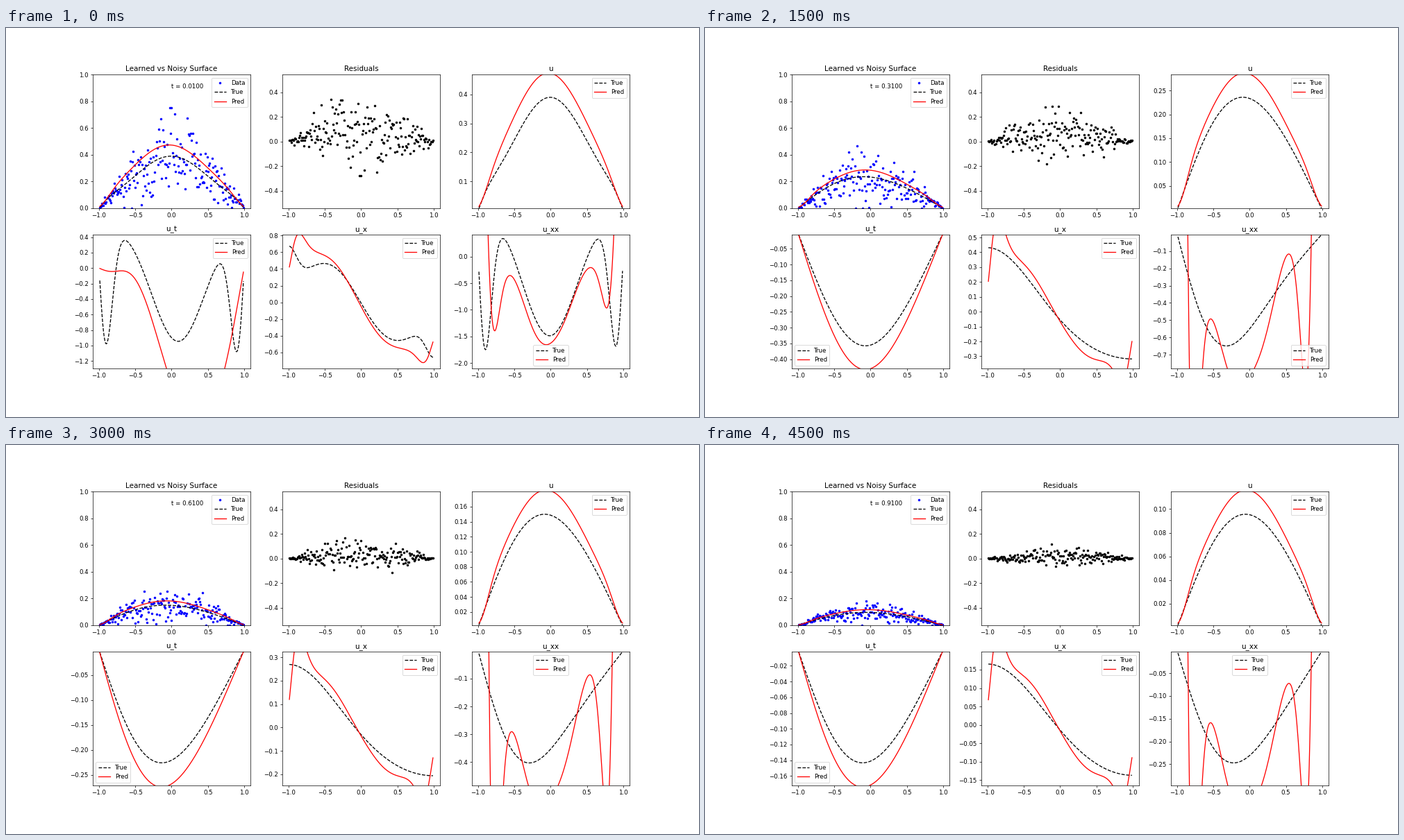
Write a matplotlib script that moves like this. It is 998 px wide and 561 px high and loops after 5000 ms.

```python
import numpy as np
import matplotlib.pyplot as plt
from matplotlib.animation import FuncAnimation

W, H, DPI = 998, 561, 62.375
FRAMES, INTERVAL = 10, 500
DIFF, ADV = 0.6, 2.0          # u_t = DIFF * u_xx + ADV * u * u_x
DX, DT = 0.01, 4e-5
GAIN = 1.215                  # learned surface lies this much too high
GRID = np.linspace(-1, 1, 201)
X = GRID[1:-1]
TIMES = 0.01 + 0.1 * np.arange(FRAMES)
LAGGED = TIMES + 0.05 * np.exp(-TIMES / 0.1)   # learned start is smoother


def slopes(u):
    ux = (u[2:] - u[:-2]) / (2 * DX)
    uxx = (u[2:] - 2 * u[1:-1] + u[:-2]) / DX ** 2
    return DIFF * uxx + ADV * u[1:-1] * ux, ux, uxx


def solve(times):
    """States (u, u_t, u_x, u_xx) at rising times, from a bell curve."""
    u = np.exp(-2 * GRID ** 2) / np.sqrt(2 * np.pi)
    u[0] = u[-1] = 0
    states, step = [], 0
    for t in times:
        while step < round(t / DT):
            u[1:-1] += DT * slopes(u)[0]
            step += 1
        states.append((u[1:-1].copy(), *slopes(u)))
    return states


def integrate(y):
    return np.concatenate([[0], np.cumsum((y[1:] + y[:-1]) / 2)]) * DX


def wiggle(t):
    """Ripple of the learned curvature, growing towards both ends."""
    r = np.abs(X)
    size = (0.7 + 24 * r ** 7) * (1 - 0.25 * X)
    return -(1 - 0.5 * np.exp(-t / 0.1)) * size * np.cos(np.pi * (0.94 * r + 2.38 * r ** 2))


def predict(true, base, t):
    top = true[0].max()
    pxx = top * (GAIN * base[3] / base[0].max() + wiggle(t))
    px = integrate(pxx)
    px -= px.mean()
    p = integrate(px)
    p = top * (0.035 + (GAIN - 0.035) * p / p.max())
    dip = 2.5 * np.exp(-t / 0.02) * np.exp(-((X - 0.45) / 0.5) ** 2) * (1 - X ** 8)
    return p, GAIN * base[1] - dip, px, pxx


def sample(u, k):
    rng = np.random.default_rng(40 + k)
    return np.maximum(u * (1 + 0.42 * rng.standard_normal(len(u))), 0)


STATES = solve(np.column_stack([TIMES, LAGGED]).ravel())
TRUE = STATES[::2]
PRED = [predict(*args) for args in zip(TRUE, STATES[1::2], TIMES)]
DATA = [sample(s[0], k) for k, s in enumerate(TRUE)]

plt.rcParams["font.family"] = "DejaVu Sans"
fig, axes = plt.subplots(2, 3, figsize=(W / DPI, H / DPI), dpi=DPI)
fig.subplots_adjust(left=0.125, right=0.9, bottom=0.125, top=0.88,
                    wspace=0.2, hspace=0.2)
surface, resid, *panels = axes.flat


def legend_spots(k):
    if k == 0:
        return "upper right", "upper right", "upper right", "lower center"
    last = "lower right" if k < 4 else "upper center"
    return "upper right", "lower left", "upper right", last


def curves(ax, true, pred, loc):
    ax.plot(X, true, "k--", label="True")
    ax.plot(X, pred, "r", label="Pred")
    ax.legend(loc=loc)


def draw(k):
    for ax in axes.flat:
        ax.clear()
    true, pred, data = TRUE[k], PRED[k], DATA[k]

    surface.plot(X, data, "b.", label="Data")
    curves(surface, true[0], pred[0], "upper right")
    surface.set_ylim(0, 1)
    surface.text(0, 0.9, f"t = {TIMES[k]:.4f}")
    surface.set_title("Learned vs Noisy Surface")

    resid.plot(X, pred[0] - data, "k.")
    resid.set_ylim(-0.542, 0.542)
    resid.set_title("Residuals")

    names = "u", "u_t", "u_x", "u_xx"
    for ax, name, a, b, loc in zip(panels, names, true, pred, legend_spots(k)):
        curves(ax, a, b, loc)
        ax.set_ylim(1.2 * a.min(), 1.2 * a.max())
        ax.set_title(name)
    return []


anim = FuncAnimation(fig, draw, frames=FRAMES, interval=INTERVAL,
                     repeat=True, repeat_delay=0)
plt.show()
```
